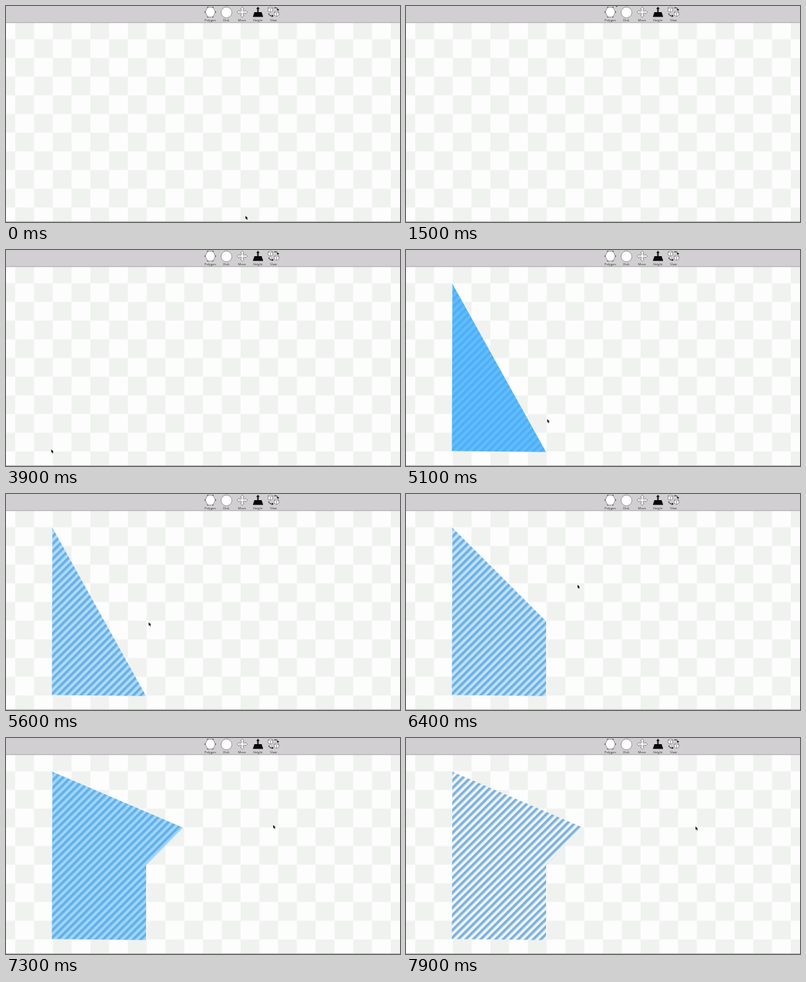
Recreate the animation shown at these times as an HTML page. Size 512 by 282 pixels, loop 8000 ms.

```html
<!DOCTYPE html>
<html lang="en">
<head>
<meta charset="utf-8">
<title>Polygon drawing</title>
<style>
  html, body { margin: 0; width: 100%; height: 100%; overflow: hidden; background: #fdfdfd; }
  svg { display: block; width: 512px; height: 282px; }
  text { font: 4px "Open Sans", Arial, sans-serif; text-anchor: middle; fill: #333; }
  .icon { fill: #fff; stroke: #555; stroke-width: .5; stroke-linejoin: round; }
  .icon .solid { fill: #080808; stroke: none; }
  .icon .line { fill: none; }
</style>
</head>
<body>
<svg viewBox="0 0 512 282">
  <defs>
    <pattern id="checker" width="48.8" height="48.8" x="12" y="19" patternUnits="userSpaceOnUse">
      <path fill="#f0f2f0" d="M0 0h24.4v24.4H0zM24.4 24.4h24.4v24.4H24.4z"/>
    </pattern>
    <pattern id="hatch" width="6.9" height="6.9" y="3.45" patternUnits="userSpaceOnUse" patternTransform="rotate(-45)">
      <rect id="light" width="6.9" height="6.9"/>
      <rect id="dark" y="1" width="6.9" height="3.4"/>
    </pattern>
  </defs>

  <rect width="512" height="282" fill="#fdfdfd"/>
  <rect y="22" width="512" height="259" fill="url(#checker)"/>
  <rect y="281" width="512" height="1" fill="#b9b9b9"/>
  <polygon id="shape" fill="url(#hatch)"/>

  <rect width="512" height="22" fill="#d1cfd1"/>
  <rect y="21.3" width="512" height=".9" fill="#aaa8aa"/>

  <g class="icon">
    <path d="M258.8 8l3.3-6.3h6.8l3.3 6.3-3.3 6.3h-6.8z"/>
    <path class="line" stroke="#222" stroke-width="1.3" stroke-linecap="round"
      d="M258.8 8h0M262.1 1.7h0M268.9 1.7h0M272.2 8h0M268.9 14.3h0M262.1 14.3h0"/>
    <circle cx="286.5" cy="8.4" r="7"/>
    <path d="M307 1l2.2 2.7h-1v3.1h3.1v-1L314 8l-2.7 2.2v-1h-3.1v3.1h1L307 15l-2.2-2.7h1V9.2h-3.1v1L300 8l2.7-2.2v1h3.1V3.7h-1z"/>
    <path class="solid" d="M322.8 8h9.4l2 6.2h-13.4z"/>
    <path class="solid" d="M327.4 1l2.2 2.8h-1.3v6h-1.8v-6h-1.3z"/>
    <path d="M340.6 2.5l3-1 3 1v4.3l-3 1.2-3-1.2zM348.6 8l3-1 3 1v4.3l-3 1.2-3-1.2z"/>
    <path class="line" d="M340.6 2.5l3 1.1 3-1.1M343.6 3.6V8M348.6 8l3 1.1 3-1.1M351.6 9.1v4.4"/>
    <path class="line" stroke="#222" stroke-width="1" d="M348.5 2.4q4-1 5 2.6M341.5 9.7q.3 3.8 5 3.3"/>
    <path class="solid" d="M351.7 4.3h3.3l-1.5 2.2zM345.7 11.2v3.4l2-1.7z"/>
  </g>
  <text x="265.5" y="20">Polygon</text>
  <text x="286.3" y="20">Disk</text>
  <text x="306.7" y="20">Move</text>
  <text x="327.3" y="20">Height</text>
  <text x="347.6" y="20">View</text>

  <path id="cursor" d="M0 0v4.2l.9-.7.8 1.7.9-.4-.8-1.6 1.3-.1z" stroke="#fff" stroke-width=".5" paint-order="stroke"/>
</svg>
<script>
const LOOP = 8000, STEP = 100, FADE = 1000;
const $ = id => document.getElementById(id);

const home = [311.3, 274];
const moves = [
  { from: 0, to: 300, end: [331, -9] },
  { from: 300, to: 1450, end: [275, -9] },
  { from: 1450, to: 1800, end: [264, 11] },
  { from: 1900, to: 2900, end: [59.5, 43.5] },
  { from: 3200, to: 3900, end: [58.8, 260.3], bend: -.065 },
  { from: 4100, to: 4800, end: [182, 263.5] },
  { from: 4900, to: 5700, end: [185.5, 166] },
  { from: 5800, to: 6650, end: [229.5, 116.7], bend: -.18 },
  { from: 6800, to: 7700, end: [376.3, 115.5], bend: -.023 }
];
const corners = [[60.3, 44], [59.6, 262.5], [182, 263.7], [182, 166], [230, 117]];
const clicks = { 3: 5000, 4: 5700, 5: 6800 }; // corner count: time

const mix = (a, b, k) => a + (b - a) * k;
const blend = (a, b, k) => `rgb(${a.map((v, i) => Math.round(mix(v, b[i], k)))})`;
const easeOut = k => k * (2 - k);

// Each move is an eased arc from the last resting point.
function pointer(t) {
  let [x, y] = home;
  for (const { from, to, end, bend = 0 } of moves) {
    if (t <= from) break;
    const k = easeOut(Math.min(1, (t - from) / (to - from)));
    const dx = end[0] - x, dy = end[1] - y, bow = 4 * k * (1 - k) * bend;
    x += dx * k - dy * bow;
    y += dy * k + dx * bow;
  }
  return [x, y];
}

function paint(t) {
  $("cursor").setAttribute("transform", `translate(${pointer(t)})`);

  const [count, start] = Object.entries(clicks).filter(c => c[1] <= t).pop() || [0, 0];
  $("shape").setAttribute("points", corners.slice(0, count).join(" "));
  const k = Math.min(1, (t - start) / FADE);
  $("light").setAttribute("fill", blend([78, 184, 255], [238, 246, 252], k));
  $("dark").setAttribute("fill", blend([76, 174, 246], [126, 176, 218], k));
}

function tick(now) {
  paint(Math.floor(now % LOOP / STEP) * STEP);
  requestAnimationFrame(tick);
}
paint(0);
requestAnimationFrame(tick);
</script>
</body>
</html>
```
